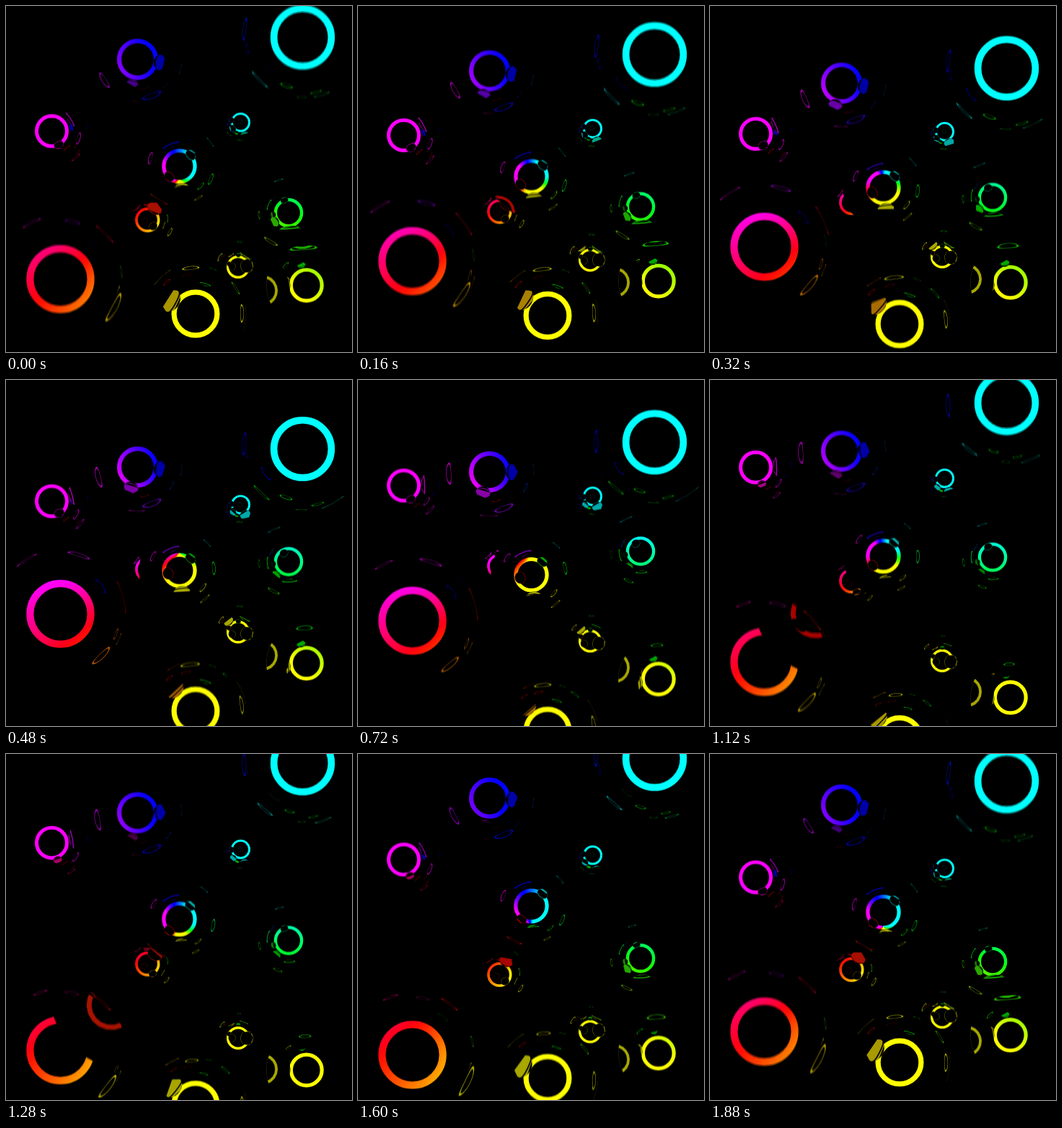
An HTML page with a canvas that plays this animation: 480 px wide and 480 px high, repeating every 1920 ms.

```html
<!DOCTYPE html>
<html>
<head>
<meta charset="utf-8">
<style>
html, body { margin: 0; width: 100%; height: 100%; overflow: hidden; background: #000; }
canvas { display: block; width: 480px; height: 480px; }
</style>
</head>
<body>
<canvas id="stage" width="480" height="480"></canvas>
<script>
const SIZE = 480, MID = SIZE / 2, LOOP = 1920, STEP = 40, TAU = Math.PI * 2;
const DEPTH = 500, BAND = 0.785, POINTS = 18, GLOW = 0.65;
const SHUTTER = [-9, 0, 9];

// Nearer balls have larger rings, so swing and mirror radius follow the ring size.
function makeBall(x, y, ring, slot) {
  const swing = 10.3 + 0.81 * ring;
  const radius = 1.88 * swing;
  const phase = (slot / 12 - 1 / 48) * TAU;
  return { x, y, ring, swing, radius, phase, cone: 2 * Math.asin(ring / radius) };
}

const balls = [
  makeBall(411.5, 49.5, 44.7, 0),
  makeBall(182.5, 94.3, 28.5, -1),
  makeBall(63.5, 150.3, 23.5, 2),
  makeBall(325.5, 153.3, 13.5, 1),
  makeBall(240.5, 240.5, 24.2, -1),
  makeBall(196.3, 282, 17.2, 5),
  makeBall(75.5, 372.5, 47.2, 6),
  makeBall(392, 262.2, 20.3, 4),
  makeBall(322, 371, 16, -5),
  makeBall(263, 464, 33.5, -3),
  makeBall(416.8, 411, 24, -4)
].sort((p, q) => p.radius - q.radius);

// Red, green and blue each light a wide sector around the middle of the stage.
function sectorColour(degrees) {
  return [136, 20, 259].map(centre => {
    const away = Math.abs(((degrees - centre) % 360 + 540) % 360 - 180);
    return Math.min(1, Math.max(0, (120 - away) / 28));
  });
}
const colourAt = (x, y) => sectorColour(Math.atan2(y, x) / TAU * 360);
const css = rgb => `rgb(${rgb.map(v => Math.round(v * 255))})`;

const stage = document.getElementById('stage').getContext('2d');
const layer = document.createElement('canvas');
layer.width = layer.height = SIZE;
const g = layer.getContext('2d');

const wheel = g.createConicGradient(0, MID, MID);
for (let d = 0; d <= 360; d += 3) wheel.addColorStop(d / 360, css(sectorColour(d)));

const add = (p, q) => [p[0] + q[0], p[1] + q[1], p[2] + q[2]];
const sub = (p, q) => [p[0] - q[0], p[1] - q[1], p[2] - q[2]];
function unit(p) {
  const n = Math.hypot(p[0], p[1], p[2]) || 1;
  return [p[0] / n, p[1] / n, p[2] / n];
}

// Where on screen the mirror ball shows a point: bisect for the tilt of the normal.
function mirror(ball, point) {
  const [dx, dy, dz] = sub(point, ball.pos);
  const side = Math.hypot(dx, dy) || 1e-6;
  let low = 0, high = Math.PI / 2;
  for (let k = 0; k < 10; k++) {
    const tilt = (low + high) / 2;
    const seen = Math.atan2(side - Math.sin(tilt), dz - Math.cos(tilt));
    if (seen > 2 * tilt) low = tilt; else high = tilt;
  }
  const reach = ball.radius * Math.sin(low) / side;
  return [ball.x + dx * reach, ball.cy + dy * reach];
}

function trace(ball, pointAt) {
  for (let k = 0; k < POINTS; k++) {
    const [x, y] = mirror(ball, pointAt(k / POINTS * TAU));
    if (k) g.lineTo(x, y); else g.moveTo(x, y);
  }
  g.closePath();
}

function disc(x, y, r) {
  g.beginPath();
  g.arc(x, y, r, 0, TAU);
}

function drawReflection(ball, other) {
  const toward = unit(sub(ball.pos, other.pos));
  const glow = add(other.pos, unit(add(toward, [0, 0, Math.cos(other.cone)])));
  const offset = sub(glow, ball.pos);
  if (offset[2] < 0 && Math.hypot(offset[0], offset[1]) < 1) return;

  const side = unit([-toward[1], toward[0], 0]);
  const up = [-toward[2] * side[1], toward[2] * side[0],
    toward[0] * side[1] - toward[1] * side[0]];
  g.beginPath();
  trace(ball, f => add(other.pos, [0, 1, 2].map(k => Math.cos(f) * side[k] + Math.sin(f) * up[k])));
  g.fillStyle = '#000';
  g.fill();

  const bandPoint = cone => f => add(other.pos, unit(add(toward,
    [Math.sin(cone) * Math.cos(f), Math.sin(cone) * Math.sin(f), Math.cos(cone)])));
  g.beginPath();
  trace(ball, bandPoint(other.cone));
  trace(ball, bandPoint(other.cone * BAND));

  // The mirror tints what it reflects.
  const [x, y] = mirror(ball, glow);
  const tint = colourAt(x - MID, y - MID);
  g.fillStyle = css(colourAt(glow[0], glow[1]).map((v, k) => v * tint[k] * GLOW));
  g.fill('evenodd');
}

function drawScene(t) {
  for (const b of balls) {
    b.cy = b.y + b.swing * Math.sin(t / LOOP * TAU + b.phase);
    b.pos = [(b.x - MID) / b.radius, (b.cy - MID) / b.radius, -DEPTH / b.radius];
  }
  g.fillStyle = '#000';
  g.fillRect(0, 0, SIZE, SIZE);

  for (const b of balls) {
    disc(b.x, b.cy, b.radius);
    g.fillStyle = '#000';
    g.fill();
    g.save();
    g.clip();
    disc(b.x, b.cy, b.ring * (1 + BAND) / 2);
    g.lineWidth = b.ring * (1 - BAND);
    g.strokeStyle = wheel;
    g.stroke();
    const distance = o => Math.hypot(...sub(o.pos, b.pos));
    balls.filter(o => o !== b)
      .sort((p, q) => distance(q) - distance(p))
      .forEach(o => drawReflection(b, o));
    g.restore();
  }
}

function render(t) {
  stage.globalCompositeOperation = 'source-over';
  stage.globalAlpha = 1;
  stage.fillStyle = '#000';
  stage.fillRect(0, 0, SIZE, SIZE);
  stage.globalCompositeOperation = 'lighter';
  stage.globalAlpha = 1 / SHUTTER.length;
  for (const offset of SHUTTER) {
    drawScene(t + offset);
    stage.drawImage(layer, 0, 0);
  }
}

const start = performance.now();
let shown = -1;
function tick() {
  const elapsed = Math.max(0, performance.now() - start) % LOOP;
  const step = Math.floor(elapsed / STEP);
  if (step !== shown) render((shown = step) * STEP);
  requestAnimationFrame(tick);
}
tick();
</script>
</body>
</html>
```
